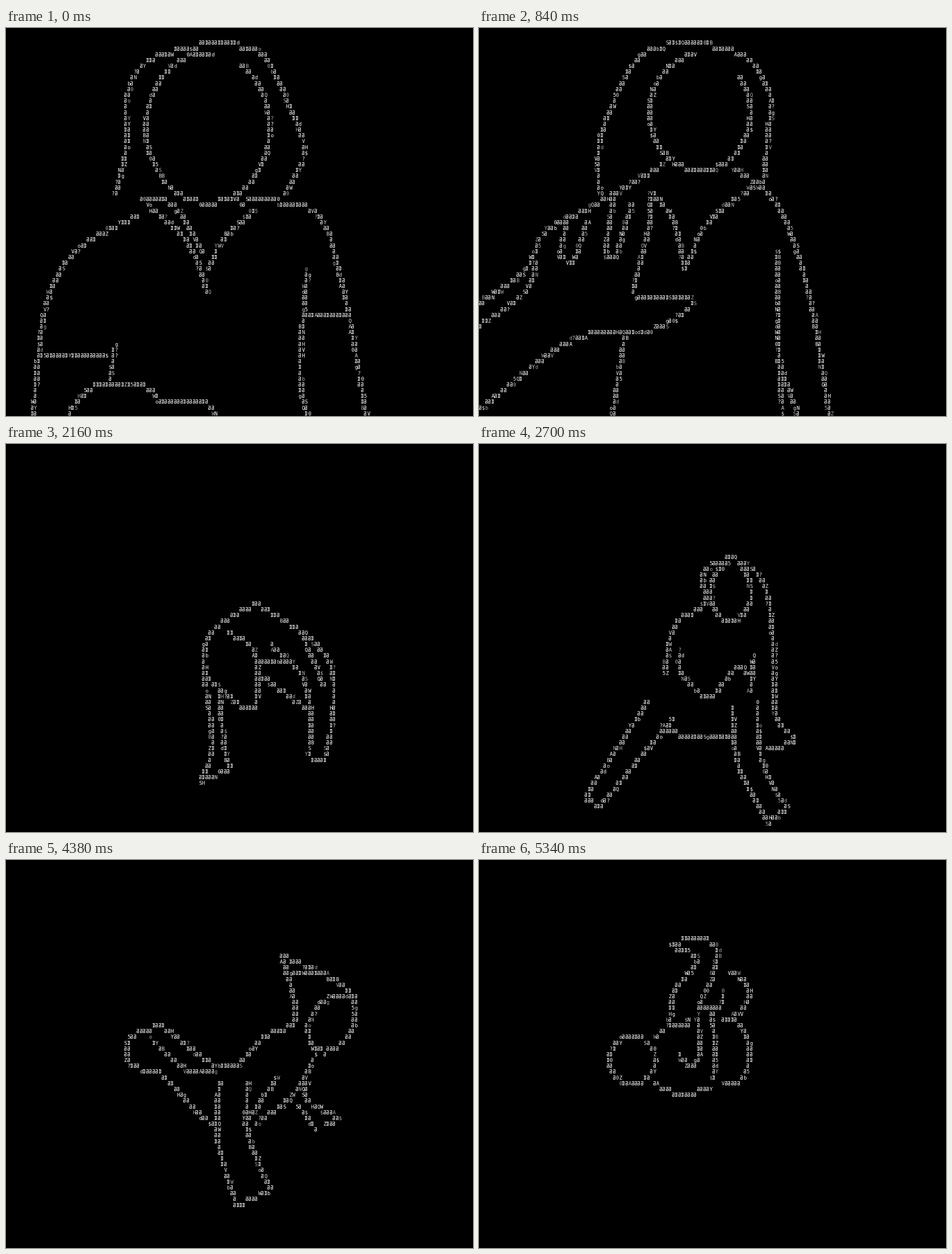
Write an HTML page with a canvas that moves like this. It is 822 by 682 pixels and loops after 5400 ms.

```html
<!DOCTYPE html>
<html lang="en">
<head>
<meta charset="utf-8">
<title>ASCII dancer</title>
<style>
html, body { margin: 0; width: 100%; height: 100%; overflow: hidden; background: #000; }
canvas { display: block; width: 822px; height: 682px; }
</style>
</head>
<body>
<canvas id="stage" width="822" height="682"></canvas>
<script>
const W = 822, H = 682, COLS = 150, ROWS = 67;
const CW = W / COLS, CH = H / ROWS;
const LOOP = 5400, STEP = 60, DETAIL = 48;
const ctx = document.getElementById('stage').getContext('2d');
ctx.font = '9px "DejaVu Sans Mono", monospace';
ctx.textAlign = 'center';

const sample = f => Array.from({ length: DETAIL + 1 }, (_, k) => f(k / DETAIL));

// Catmull-Rom spline through "x y,x y,..." as a function of 0..1
function spline(text) {
  const p = text.split(',').map(s => s.split(' ').map(Number));
  const at = i => p[Math.max(0, Math.min(p.length - 1, i))];
  return v => {
    const u = v * (p.length - 1);
    const i = Math.min(p.length - 2, Math.floor(u)), f = u - i;
    const [a, b, c, d] = [at(i - 1), at(i), at(i + 1), at(i + 2)];
    return [0, 1].map(n => b[n] + f / 2 * (c[n] - a[n]
      + f * (2 * a[n] - 5 * b[n] + 4 * c[n] - d[n]
      + f * (3 * (b[n] - c[n]) + d[n] - a[n]))));
  };
}

const path = text => sample(spline(text));

// Part of an ellipse, angles in degrees, clockwise from the right
const ring = (x, y, rx, ry, from = 0, to = 360) => sample(u => {
  const a = (from + (to - from) * u) * Math.PI / 180;
  return [x + rx * Math.cos(a), y + ry * Math.sin(a)];
});

// Outline of a tapered limb around its bone, down one side and back up
function limb(text, top, tip) {
  const bone = spline(text);
  return sample(v => {
    const u = 1 - Math.abs(2 * v - 1), side = v <= 0.5 ? 1 : -1;
    const [x, y] = bone(u);
    const [ax, ay] = bone(Math.max(0, u - 0.02)), [bx, by] = bone(Math.min(1, u + 0.02));
    const r = side * (top + (tip - top) * u) / Math.hypot(bx - ax, by - ay);
    return [x - (by - ay) * r, y + (bx - ax) * r];
  });
}

const closeUp = [
  path('360 26,254 56,213 120,213 205,191 300'),
  path('360 26,448 42,490 115,525 215,490 292'),
  ring(356, 175, 109, 132, -60, 275),
  path('235 328,120 395,68 500,49 682'),
  path('405 305,540 320,590 440,635 682'),
  path('250 311,320 375,356 466'),
  path('440 318,380 375,356 430'),
  path('531 423,518 600,531 682'),
  path('109 677,160 628,245 630,275 657,345 657,370 677'),
  path('194 555,183 620'),
  path('63 575,180 575'),
  path('525 504,600 504'),
  path('235 301,295 311,350 400')
];

const reach = [
  path('390 26,300 38,254 95,213 200,213 295'),
  path('390 26,470 50,512 115,509 190,500 280'),
  ring(390, 148, 89, 102, -40, 265),
  path('325 240,200 313,115 360,82 425,-5 488'),
  path('448 245,525 310,580 460,618 682'),
  path('300 285,341 335,362 420'),
  path('485 278,405 340,362 425'),
  path('527 392,528 560,535 682'),
  path('275 474,360 474,372 490,300 532,165 548,0 672'),
  path('257 540,235 682'),
  path('100 410,82 464,-5 526'),
  path('528 585,563 682'),
  path('303 295,300 350,270 465'),
  limb('254 301,232 400', 18, 9),
  limb('175 330,155 408', 18, 14)
];

const crouch = [
  path('440 280,352 350,364 525,342 592'),
  path('440 280,540 345,578 415,564 545,535 553'),
  path('390 331,436 360,443 440,425 466,356 412'),
  path('375 435,386 540,395 568,342 594'),
  path('523 338,563 430'),
  path('465 352,520 405,537 480,533 548'),
  path('440 400,531 466'),
  path('450 382,495 382')
];

const lunge = [
  path('445 199,394 225,398 280,345 318,328 405'),
  path('445 199,500 240,518 345,523 475,556 520,505 535'),
  ring(444, 260, 36, 50, -60, 270),
  limb('322 465,262 545,198 632', 28, 14),
  limb('468 455,478 560,528 655', 22, 20),
  path('356 362,356 400,405 443,454 392,473 404'),
  path('485 372,478 440'),
  path('320 494,365 512,450 514')
];

const handstand = [
  path('430 209,350 265,343 380,298 490,323 500,358 494'),
  path('430 209,535 252,558 345,530 430,525 490,560 514,500 528'),
  ring(506, 342, 51, 58, 60, 300),
  ring(302, 338, 30, 36, 40, 380),
  path('514 403,509 464,500 525'),
  path('443 311,391 374,358 425,356 490'),
  path('438 341,440 400,514 403'),
  path('394 380,365 423'),
  path('303 362,338 395')
];

const kick = [
  path('487 168,510 278,455 311,405 362,365 362'),
  path('487 168,600 225,612 290,580 331,545 331,528 290'),
  path('617 240,560 247,530 288'),
  path('273 290,219 314,220 360,275 378,350 454,380 454'),
  limb('402 385,398 470,416 540,438 596', 24, 33),
  path('545 341,503 415,437 464'),
  path('531 385,531 422,585 453,560 464'),
  path('478 382,421 464'),
  path('273 290,355 352,385 362'),
  path('254 313,320 369,370 372'),
  path('514 428,547 474'),
  path('487 198,545 200')
];

const tuck = [
  path('395 138,340 148,385 175,345 229,335 285,310 312'),
  path('395 138,420 158,408 215,385 260'),
  ring(440, 236, 36, 37, -90, 80),
  ring(270, 351, 41, 41),
  ring(440, 338, 37, 58, -110, 110),
  path('385 270,388 340,375 362,350 341'),
  path('430 230,425 258,386 260'),
  path('410 265,416 340,412 390'),
  path('306 392,358 412,410 398'),
  path('335 288,370 290,365 280')
];

// Time, pose, and how far the body stretches out on the way to the next
const keys = [
  [0, closeUp, 0],
  [840, reach, 0],
  [2160, crouch, 0.4],
  [2700, lunge, 0.2],
  [3600, handstand, 0.35],
  [4380, kick, 0.35],
  [5340, tuck, 0]
];

function mix(a, b, p) {
  const n = Math.max(a.length, b.length);
  return Array.from({ length: n }, (_, i) => {
    if (!a[i] || !b[i]) return (p < 0.5 ? a[i] : b[i]) || [];
    return a[i].map(([x, y], k) => [x + (b[i][k][0] - x) * p, y + (b[i][k][1] - y) * p]);
  });
}

function stretch(lines, s) {
  const pts = lines.flat();
  const [cx, cy] = [0, 1].map(n => pts.reduce((sum, q) => sum + q[n], 0) / pts.length);
  return lines.map(l => l.map(([x, y]) => [cx + (x - cx) * s, cy + (y - cy) * s]));
}

function poseAt(t) {
  const i = Math.max(1, keys.findIndex(k => k[0] >= t));
  const [t0, a, swell] = keys[i - 1], [t1, b] = keys[i];
  const p = (t - t0) / (t1 - t0);
  return stretch(mix(a, b, Math.sin(p * Math.PI / 2)), 1 + swell * Math.sin(p * Math.PI));
}

function noise(a, b, c) {
  const s = Math.sin(a * 12.9898 + b * 78.233 + c * 37.719) * 43758.5453;
  return s - Math.floor(s);
}

const ink = new Float32Array(COLS * ROWS);

// Lays a line over the character grid with a 9px wide nib
function trace(line) {
  for (let i = 1; i < line.length; i++) {
    const [x0, y0] = line[i - 1], [x1, y1] = line[i];
    const len = Math.hypot(x1 - x0, y1 - y0), n = Math.ceil(len);
    for (let k = 0; k < n; k++) {
      const x = x0 + (x1 - x0) * k / n, row = Math.floor((y0 + (y1 - y0) * k / n) / CH);
      if (row < 0 || row >= ROWS) continue;
      for (let d = -4; d <= 4; d++) {
        const col = Math.floor((x + d) / CW);
        if (col >= 0 && col < COLS) ink[row * COLS + col] += len / n;
      }
    }
  }
}

const pick = (set, r) => set[Math.floor(r * set.length)];
const across = (x, y) => ctx.fillRect(x, y, 4, 1);
const down = (x, y, h) => ctx.fillRect(x, y, 1, h);

// The two square signs that fill most of the line
function boxSign(x, y) {
  across(x, y);
  across(x, y + 3);
  across(x, y + 6);
  down(x, y + 3, 4);
  down(x + 3, y, 7);
}

function barSign(x, y) {
  across(x, y);
  across(x, y + 6);
  down(x + 1, y, 7);
  down(x + 3, y, 7);
}

function glyph(col, row, v, frame) {
  const r = noise(col, row, frame);
  const x = Math.round(col * CW), y = Math.round(row * CH) + 2;
  ctx.fillStyle = v < 27 ? '#aaa' : v < 35 ? '#fff' : '#ddd';
  if (v >= 35 && r < 0.72) boxSign(x, y);
  else if (v >= 35 && r < 0.92) barSign(x, y);
  else ctx.fillText(pick('QHNZSWAVgBd05b$o?Y', noise(row, frame, col)), x + CW / 2, y + 7);
}

function draw() {
  const frame = Math.floor(performance.now() % LOOP / STEP);
  ink.fill(0);
  poseAt(frame * STEP).forEach(trace);
  ctx.fillStyle = '#000';
  ctx.fillRect(0, 0, W, H);
  ink.forEach((v, i) => {
    if (v > 22) glyph(i % COLS, Math.floor(i / COLS), v, frame);
  });
  requestAnimationFrame(draw);
}
draw();
</script>
</body>
</html>
```
